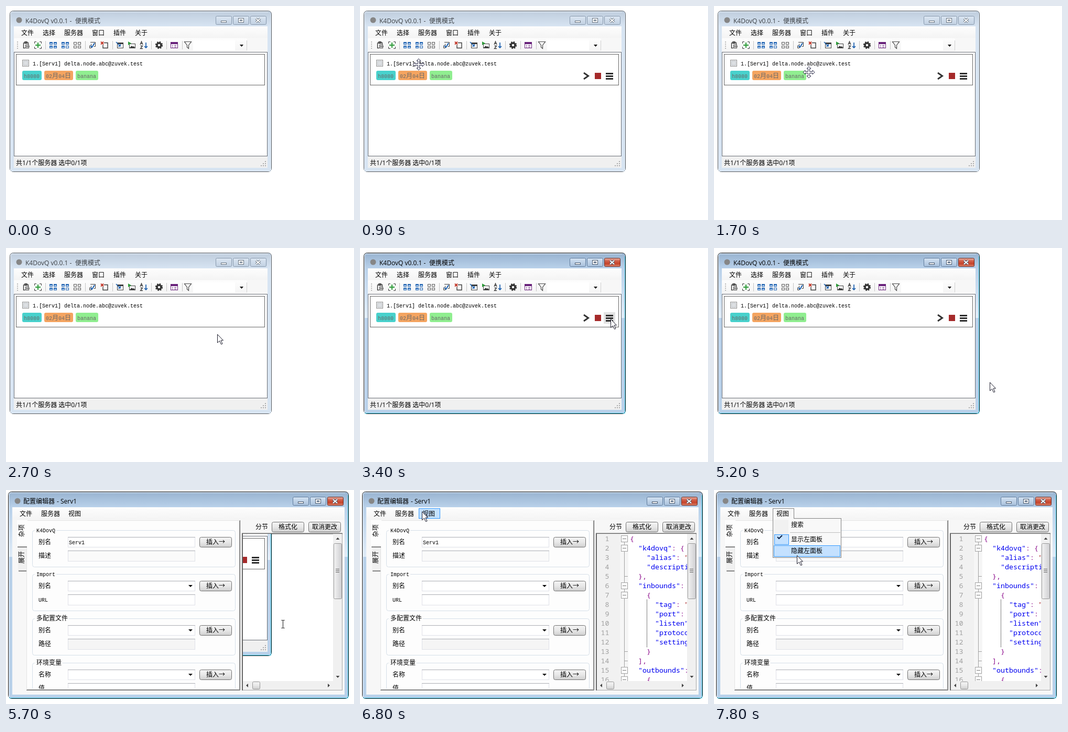
Animation, 664 px wide and 410 px high, one loop 8000 ms. Source, as an HTML page:

```html
<!DOCTYPE html>
<html lang="zh-CN">
<head>
<meta charset="utf-8">
<title>Window demo</title>
<style>
html, body { margin: 0; width: 100%; height: 100%; overflow: hidden; background: #fff; }
svg { display: block; width: 664px; height: 410px; }
text { font: 12px "Noto Sans CJK SC", "Noto Sans CJK", sans-serif; white-space: pre; }
.ui tspan { font: 12px "Open Sans", "Noto Sans", sans-serif; }
.mono tspan { font: 10px "Liberation Mono", monospace; }
.code { font: 13.35px "Noto Sans Mono", "DejaVu Sans Mono", monospace; }
.off { display: none; }
</style>
</head>
<body>
<svg id="stage" viewBox="0 0 664 410"></svg>
<script>
const LOOP = 8000, STEP = 100;
const BLUE = '#1b5fae', DARK = '#3c3c3c', HOVER = '#c4e1ff', HOVER_EDGE = '#3399ff';

// ---- drawing helpers ----
const rect = (x, y, w, h, fill, stroke, rx = 0) => stroke
  ? `<rect x="${x + .5}" y="${y + .5}" width="${w - 1}" height="${h - 1}" rx="${rx}" fill="${fill}" stroke="${stroke}"/>`
  : `<rect x="${x}" y="${y}" width="${w}" height="${h}" rx="${rx}" fill="${fill}"/>`;
const path = (d, stroke, width = 1, fill = 'none') =>
  `<path d="${d}" fill="${fill}" stroke="${stroke}" stroke-width="${width}"/>`;
const fillPath = (d, fill) => `<path d="${d}" fill="${fill}"/>`;
const group = (id, body, attrs = '') => `<g id="${id}" ${attrs}>${body}</g>`;
const at = (x, y, body) => `<g transform="translate(${x} ${y})">${body}</g>`;
// Latin runs get their own font beside the CJK one; y is the middle of the line.
const text = (x, y, s, cls = 'ui', fill = '#000', anchor = 'start') =>
  `<text x="${x}" y="${y + 4.5}" class="${cls}" fill="${fill}" text-anchor="${anchor}">` +
  s.replace(/[ -~]+/g, '<tspan>$&</tspan>') + '</text>';
const gradient = (id, ...stops) => `<linearGradient id="${id}" x2="0" y2="1">` +
  stops.map((c, i) => `<stop offset="${i / (stops.length - 1)}" stop-color="${c}"/>`).join('') + '</linearGradient>';
const clip = (id, x, y, w, h) => `<clipPath id="${id}">${rect(x, y, w, h, '#000')}</clipPath>`;
const button = (x, y, label) => rect(x, y, 62, 20, 'url(#button)', '#707070', 3) +
  text(x + 31, y + 9.5, label, 'mono', '#000', 'middle');
const field = (x, y, w, h, fill = '#fff') => rect(x, y, w, h, fill, '#dfe1e8') +
  path(`M${x} ${y + .5}h${w}`, '#abadb3');

function captionButtons(x, y, active) {
  const edge = active ? '#5f7a9b' : '#8798ac', ink = active ? '#45556a' : '#66727f';
  const box = (dx, fill, stroke) => rect(x + dx, y, 31, 17, fill, stroke, 2);
  const face = active ? 'url(#cap)' : 'url(#capIdle)';
  return box(0, face, edge) + box(33, face, edge) +
    box(66, active ? 'url(#capClose)' : face, active ? '#6b2a22' : edge) +
    rect(x + 10, y + 9, 11, 4, '#fff', ink) +
    rect(x + 43, y + 4, 11, 9, '#fff', ink) + rect(x + 46, y + 7, 5, 3, face, ink) +
    path(`M${x + 77} ${y + 5}l8 7m0-7l-8 7`, ink, 4) + path(`M${x + 77} ${y + 5}l8 7m0-7l-8 7`, '#fff', 2);
}

function frame(x, y, w, h, active) {
  const r = x + w, b = y + h;
  const side = sx => active ? rect(sx, y + 30, 6, 95, 'url(#side)') : '';
  return rect(x, y, w, h, active ? '#b9d1ea' : '#d7e4f2', active ? '#111' : '#4c5259', 6) +
    fillPath(`M${x + 1} ${y + 30}V${y + 7}q0-6 6-6H${r - 7}q6 0 6 6V${y + 30}z`, active ? 'url(#title)' : 'url(#titleIdle)') +
    side(x + 2) + side(r - 8) +
    path(`M${x + 1.5} ${b - 2}V${y + 7}q0-5 5-5H${r - 7}`, '#f0f6fc') +
    path(`M${r - 1.5} ${y + 7}V${b - 1.5}H${x + 2}`, active ? '#3fd0ee' : '#e4eef8') +
    captionButtons(r - 107, y + 10, active);
}

// ---- main window ----
const squares = (full, color) => [0, 1, 2, 3].map(i =>
  rect(-7 + i % 2 * 8, -6 + (i >> 1) * 7, 6, 5, i < full ? '#b9d4f3' : '#fff', i < full ? BLUE : color) +
  (i < full ? rect(-7 + i % 2 * 8, -6 + (i >> 1) * 7, 6, 2, BLUE) : '')).join('');

const icons = [
  [38, path('M-4.5-4.5h9v3M-4.5-4.5v10h3M-2-6.5h4v3h-4z', DARK, 1.4) + rect(-1, -1, 7, 7, '#fff', DARK) + path('M7 2.500h-6m2-2l-2 2 2 2', DARK)],
  [61, path('M-6.500-3v-3.500h3.500M3-6.500h3.500V-3M6.500 3v3.500H3M-3 6.500h-3.500V3', DARK) + path('M-5 0H5M0-5V5', '#2c9a38', 2)],
  [90, squares(4)],
  [113, squares(3, BLUE)],
  [136, squares(0, '#555')],
  [165, path('M-4-5.500h9.500v8h-3M-2.500-2.500v8h-3v-5', DARK) + path('M-4 1l3 3 5-8', BLUE, 2)],
  [188, path('M-1-4.500h7v10h-9v-6', DARK, 1.4) + path('M-7-6.500l5 5m0-5l-5 5', '#c23325', 2)],
  [217, rect(-5, -4, 12, 10, '#fff', DARK) + rect(-5, -5, 12, 3, DARK) + path('M-7-6L1 2m0-4v4h-4', BLUE, 1.6)],
  [240, rect(-5, -3, 12, 9, '#fff', DARK) + fillPath('M-4 5l4-4 2 2 2-1 2 3z', DARK) + fillPath('M-7-7l6 3.500-6 3.500z', '#2c9a38')],
  [263, path('M-7-1l2.500-6 2.500 6M-6-3h3M-6.500 1.500h4l-4 5h4.500', DARK, 1.3) + path('M4-5V5M1 2l3 3 3-3', BLUE, 1.7)],
  [292, '<circle r="4" fill="none" stroke="#333" stroke-width="3.400"/>' +
    '<circle r="6" fill="none" stroke="#333" stroke-width="2.400" stroke-dasharray="2.500 2.212"/>'],
  [321, rect(-7, -6, 14, 12, '#fff', '#68217a') + rect(-7, -6, 14, 4, '#68217a') + path('M-4 0.500h2m2 0h4M-4 3.500h2m2 0h4', '#68217a')],
  [347, path('M-6.500-6.500h13L1.500 0V6.500L-1.500 4V0z', '#444', 1.2, '#fff')]
];

const toolbar = rect(15, 62, 445, 26, 'url(#bar)', '', 2) + path('M459.5 66V85', '#d0d0d0') +
  [68, 72, 76, 80].map(y => rect(21, y, 2, 2, '#b5b5b5')).join('') +
  [75, 151, 203, 277, 306, 336].map(x => path(`M${x + .5} 67V83`, '#c4c4c4')).join('') +
  icons.map(([x, body]) => at(x, 75, body)).join('') +
  rect(357, 66, 80, 19, '#fff') + fillPath('M446 74h7l-3.500 4z', '#000');

const tag = (x, w, color, label) => rect(x, 124, w, 18, color, '', 3) + text(x + 3, 133, label, 'mono', '#696969');

const rowButtons = path('M427 128l8.500 6-8.500 6', '#333', 3) + rect(448, 128, 12, 12, '#a52a2a') +
  path('M469 129.500h14M469 134.500h14M469 139.500h14', '#2e2e2e', 3);

const grip = [0, 1, 2].map(r => [0, 1, 2].filter(c => c + r > 1).map(c =>
  rect(486 + c * 4, 297 + r * 4, 2, 2, '#aaa')).join('')).join('');

const mainWindow = group('idleFrame', frame(7, 9, 500, 309, false)) + group('activeFrame', frame(7, 9, 500, 309, true)) +
  '<circle cx="25" cy="27" r="5.500" fill="#868686"/>' +
  group('mainTitle', text(37, 28, 'K4DovQ v0.0.1 -') + text(132, 28, '便携模式')) +
  rect(15, 39, 484, 271, '#f0f0f0') + rect(15, 39, 484, 49, '#f7f7f7') + rect(15, 39, 484, 22, 'url(#bar)') +
  [[29, '文件'], [70, '选择'], [111, '服务器'], [164, '窗口'], [205, '插件'], [246, '关于']]
    .map(([x, s]) => text(x, 51, s)).join('') + toolbar +
  rect(15, 88, 484, 200, '#fff', '#686c74') + rect(19, 92, 475, 60, '#fff', '#646464') +
  rect(31, 103, 13, 13, '#f4f4f4', '#8e8f8f') + rect(33, 105, 9, 9, '#dcdfe2', '#c0c5ca') +
  text(51, 109, '1.[Serv1] delta.node.abc@zuvek.test', 'mono') +
  tag(31, 37, '#48d1cc', 'h8080') + tag(73, 55, '#f4a460', '02月04日') + tag(133, 43, '#90ee90', 'banana') +
  group('rowButtons', group('menuHover', rect(465, 123, 22, 22, '#e3e3e3')) + rowButtons) +
  rect(15, 289, 484, 21, '#f0f0f0') + text(19, 300, '共1/1个服务器 选中0/1项') + grip;

// ---- context menu ----
const contextItems = [[157, '操作', 1], [179, '移动', 1], [201, '复制', 1], [229, '设定及二维码'], [251, 'Json编辑器'],
  [273, '查看最终配置'], [295, '删除'], [323, '此服务器日志'], [345, '速度测试']];
const contextMenu = rect(465, 144, 149, 214, '#f8f8f8', '#808080') + rect(467, 146, 24, 210, '#f1f1f1') +
  [215, 309].map(y => path(`M498 ${y + .5}H612`, '#bdbdbd')).join('') +
  group('contextHover', rect(467, 0, 145, 22, HOVER, HOVER_EDGE)) +
  contextItems.map(([y, s, sub]) => text(501, y, s) + (sub ? fillPath(`M598 ${y - 3.5}v8l4-4z`, '#000') : '')).join('');

// ---- editor window ----
function settingsGroup(i, title, first, second, combo, secondFill) {
  const y = Math.round(76.5 + i * 84.7);
  return rect(50, y, 388, 71, 'none', '#d5dfe8', 4) +
    rect(55, y - 4, title.length * (/[ -~]/.test(title) ? 6 : 12) + 5, 9, '#fdfdfd') + text(58, y - .5, title, 'mono') +
    text(62, y + 22, first, 'mono') + field(118, y + 13, 243, 20) +
    (combo ? fillPath(`M348 ${y + 21}h8l-4 4z`, '#000') : text(120, y + 22, 'Serv1', 'mono')) +
    button(369, y + 13, '插入→') +
    text(62, y + 48.5, second, 'mono') + field(118, y + 39, 243, 21, secondFill);
}

const sideTab = (x, y, h, label, fill) => rect(x, y, 41 - x, h, fill) +
  path(`M${x + 1} ${y + h - 1.5}H40`, '#a0a0a0') + path(`M${x + 1} ${y + h - .5}H40`, '#696969') +
  `<g transform="rotate(-90 29 ${y + 20})">${text(29, y + 20, label, 'mono', '#000', 'middle')}</g>`;

const leftPanel = sideTab(23, 109, 47, '展开', '#f0f0f0') + rect(39, 58, 408, 326, '#fdfdfd', '#e3e3e3') +
  path('M445.5 59V382.500H40', '#a0a0a0') + path('M446.5 58V383.500H39', '#696969') +
  sideTab(21, 58, 52, '杂项', '#fdfdfd') +
  '<g clip-path="url(#leftClip)">' +
  settingsGroup(0, 'K4DovQ', '别名', '描述', false, '#fafafa') + settingsGroup(1, 'Import', '别名', 'URL', true) +
  settingsGroup(2, '多配置文件', '别名', '路径', true, '#f5f5f5') + settingsGroup(3, '环境变量', '名称', '值', true) + '</g>';

const codeLines = ['{', '  "k4dovq": {', '    "alias": "', '    "description"', '  },', '  "inbounds": [', '    {',
  '      "tag": "', '      "port": ', '      "listen": ', '      "protocol"', '      "settings"',
  '    }', '  ],', '  "outbounds": [', '    {'];

function codeLine(source, i) {
  const y = 93 + i * 18, indent = source.search(/\S/), x = 515 + indent * 8;
  const body = source.trim().replace(/("\w+")|([{}\[\],:]+)|(")/g, (m, key, mark) =>
    `<tspan fill="${key ? '#0000f0' : mark ? '#8b0a8b' : '#a31515'}">${m}</tspan>`);
  const fold = /[{\[]$/.test(source), end = /^\s*[}\]]/.test(source);
  return `<text class="code" x="475.5" y="${y + 4.5}" fill="#a0a0a0" text-anchor="end">${i + 1}</text>` +
    `<text class="code" x="${x}" y="${y + 4.5}">${body}</text>` +
    (fold ? rect(498, y - 6, 13, 13, '#fff', '#a0a0a0') + path(`M501 ${y + .5}h7`, '#777') : '') +
    (end ? path(`M505 ${y + .5}h6`, '#a0a0a0') : '');
}

const codePane = rect(452, 84, 173, 282, '#fff') + rect(452, 84, 44, 282, '#f1f1f1') + rect(496, 84, 16, 282, '#f6f6f6') +
  path('M504.5 93V366', '#a0a0a0') + codeLines.map(codeLine).join('') +
  '<path d="M547.5 210V301" stroke="#000" stroke-dasharray="1 1"/>';

const scrollbars = rect(624, 84, 17, 282, '#f0f0f0') + rect(452, 366, 189, 17, '#f0f0f0') +
  rect(625, 102, 16, 107, 'url(#thumb)', '#979797', 2) + rect(470, 367, 15, 15, 'url(#button)', '#979797', 2) +
  path('M629 151.500h7M629 154.500h7M629 157.500h7', '#666') +
  fillPath('M629.5 95h7l-3.500-4zM629.5 356h7l-3.500 4zM462 371v7l-4-3.500zM614 371v7l4-3.500z', '#444');

const editor = frame(4, 3, 650, 397, true) + '<circle cx="22" cy="21" r="5.500" fill="#868686"/>' +
  text(33, 21, '配置编辑器') + text(97, 21, '- Serv1') +
  rect(12, 33, 634, 359, '#f0f0f0') + rect(12, 33, 634, 24, 'url(#bar)') + rect(12, 57, 634, 335, '#f7f7f7') +
  group('serverHover', rect(60, 35, 49, 20, HOVER, HOVER_EDGE)) +
  group('viewHover', rect(112, 35, 41, 20, HOVER, HOVER_EDGE)) +
  group('viewOpen', rect(112, 35, 41, 21, '#f8f8f8', '#808080')) +
  text(26, 45, '文件') + text(67, 45, '服务器') + text(119, 45, '视图') + leftPanel +
  text(476, 70, '分节', 'mono') + button(507, 61, '格式化') + button(577, 61, '取消更改') +
  rect(450, 83, 192, 301, '#fff', '#a8a8a8') + path('M451 384V83.500H642', '#666', 2) +
  '<g clip-path="url(#paneClip)"><use href="#main"/>' + group('code', codePane) + '</g>' + scrollbars;

const viewMenu = rect(112, 54, 131, 76, '#f8f8f8', '#808080') + rect(113, 53, 39, 3, '#f8f8f8') +
  rect(114, 57, 28, 71, '#f1f1f1') + path('M145 81.500H241', '#bdbdbd') +
  group('viewItemHover', rect(114, 0, 127, 22, HOVER, HOVER_EDGE)) +
  rect(115, 85, 28, 20, HOVER, HOVER_EDGE) + path('M121 90l3 3 6-6', '#0a1f44', 2) +
  text(147, 66.5, '搜索') + text(147, 94.5, '显示左面板') + text(147, 116.5, '隐藏左面板');

// ---- pointers ----
const pointers = group('arrow', path('M.5.5V16.500L4.500 13 7.500 19.500 10 18.500 7 12H11.500z', '#1c1c2c', 1, '#fff')) +
  group('move', path('M0-11l4 4h-2.500v5.500h5.500v-2.500l4 4-4 4v-2.500h-5.500v5.500h2.500l-4 4-4-4h2.500v-5.500h-5.500v2.500l-4-4 4-4v2.500h5.500v-5.500h-2.500z', '#2a2a48', 1, '#fff')) +
  group('beam', path('M-2.500-7.500h2.500l.5.5.5-.5h2.500M.5-7V7M-2.500 7.500h2.500l.5-.5.5.5h2.500', '#111'));

document.getElementById('stage').innerHTML = '<defs>' +
  gradient('titleIdle', '#bfcddd', '#d7e4f2') + gradient('title', '#98b3d0', '#b9d1ea') +
  gradient('side', '#b9d1ea', '#e0ecf8') +
  gradient('capIdle', '#dbe6f2', '#c2d1e2') + gradient('cap', '#d3e2f2', '#a9c1dc') +
  gradient('capClose', '#e9b5a8', '#d2604a', '#c5432a', '#dc8870') +
  gradient('bar', '#fdfdfd', '#f4f4f4') + gradient('button', '#f4f4f4', '#e8e8e8', '#cfcfcf') +
  '<linearGradient id="thumb"><stop stop-color="#f3f3f3"/><stop offset="1" stop-color="#cfcfd2"/></linearGradient>' +
  clip('leftClip', 40, 59, 405, 322) + clip('paneClip', 452, 84, 172, 282) + '</defs>' +
  group('main', mainWindow) + group('context', contextMenu) + group('editor', editor) +
  group('viewMenu', viewMenu) + group('pointer', pointers);

// ---- motion ----
// [time, x, y]; the pointer moves in straight lines between these stops.
const track = [[400, 558, 50], [500, 413, 82], [600, 260, 96], [700, 150, 104], [900, 112, 112], [1200, 128, 119],
  [1400, 157, 137], [1700, 181, 127], [1900, 187, 126], [2000, 187, 126], [2300, 237, 130], [2500, 353, 164],
  [2700, 403, 165], [2900, 428, 140], [3200, 478, 136], [3600, 478, 136], [3900, 513, 223], [4100, 524, 256],
  [4200, 524, 256], [4400, 526, 257], [5500, 526, 257], [5600, 528, 257], [6000, 528, 257], [6200, 430, 205],
  [6300, 344, 148], [6500, 150, 64], [6600, 96, 45], [6800, 118, 41], [7300, 118, 41], [7600, 147, 104], [7800, 158, 125]];

const $ = id => document.getElementById(id);
const show = (id, on) => $(id).classList.toggle('off', !on);
const within = (v, a, b) => v >= a && v < b;

function pointerAt(t) {
  const i = track.findIndex(p => p[0] > t);
  if (i < 1) return track[i < 0 ? track.length - 1 : 0].slice(1);
  const [t0, x0, y0] = track[i - 1], [t1, x1, y1] = track[i], k = (t - t0) / (t1 - t0);
  return [Math.round(x0 + (x1 - x0) * k), Math.round(y0 + (y1 - y0) * k)];
}

function highlight(id, centers, y, on) {
  const center = centers.find(c => within(y, c - 11, c + 11));
  show(id, on && center !== undefined);
  if (center) $(id).setAttribute('transform', `translate(0 ${center - 11})`);
}

function render(t) {
  const [x, y] = pointerAt(t), inEditor = t >= 5600;
  const inRow = within(x, 20, 494) && within(y, 93, 152);
  const contextOpen = within(t, 3500, 5200), viewOpen = t >= 7000;

  show('idleFrame', t < 3400);
  show('activeFrame', t >= 3400);
  $('mainTitle').setAttribute('opacity', t < 3400 ? .7 : 1);
  show('rowButtons', t >= 3400 || t >= 400 && inRow);
  show('menuHover', inRow && x > 465 && within(t, 3000, 3700));
  show('context', contextOpen);
  highlight('contextHover', contextItems.map(item => item[0]), y, t >= 3700);

  show('editor', inEditor);
  show('code', t >= 5800);
  const inMenuBar = inEditor && within(y, 35, 56);
  show('serverHover', inMenuBar && within(x, 60, 109));
  show('viewHover', inMenuBar && within(x, 112, 153) && !viewOpen);
  show('viewOpen', viewOpen);
  show('viewMenu', viewOpen);
  highlight('viewItemHover', [67, 95, 117], y, viewOpen);

  const beam = inEditor && x > 512 && within(y, 84, 366);
  const move = !inEditor && inRow && x < 420;
  show('pointer', t >= 400);
  show('beam', beam);
  show('move', move);
  show('arrow', !beam && !move);
  $('pointer').setAttribute('transform', `translate(${x} ${y})`);
}

const start = performance.now();
function tick() {
  const t = (performance.now() - start) % LOOP;
  render(Math.floor(t / STEP) * STEP);
  requestAnimationFrame(tick);
}
tick();
</script>
</body>
</html>
```
